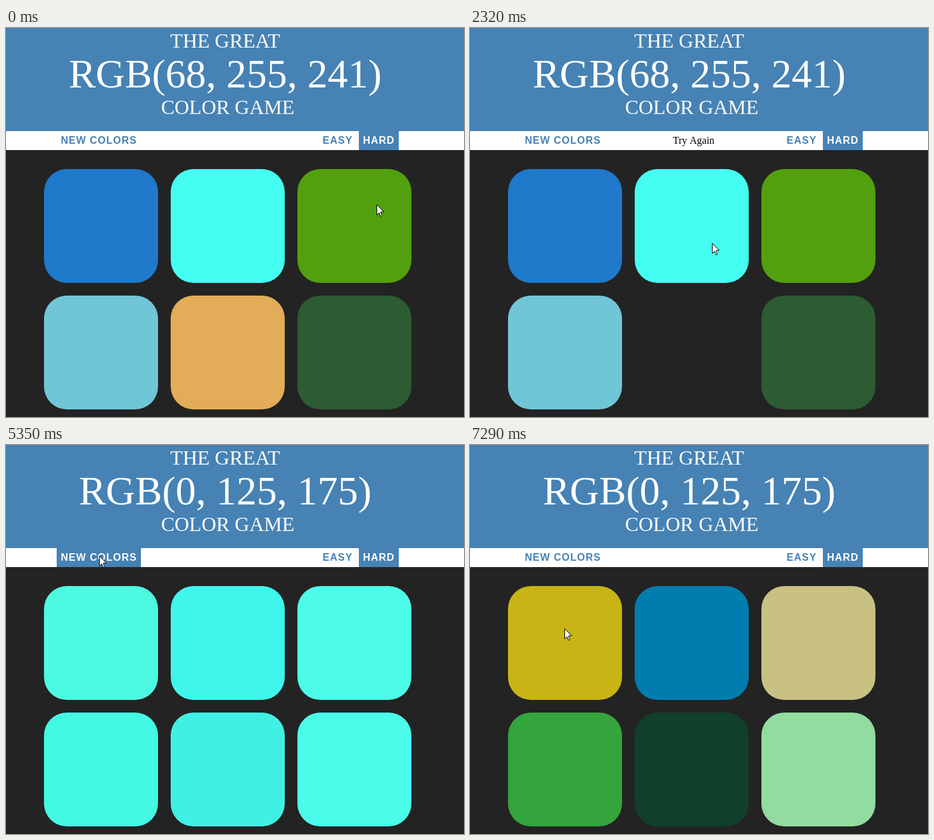
An HTML page with a canvas that plays this animation: 723x615 px, repeating every 8 s.

```html
<!DOCTYPE html>
<html lang="en">
<head>
<meta charset="utf-8">
<title>Color game</title>
<style>
  html, body { margin: 0; width: 100%; height: 100%; overflow: hidden; background: #232323; }
  canvas { display: block; }
</style>
</head>
<body>
<canvas id="stage" width="723" height="615"></canvas>
<script>
const ctx = document.getElementById('stage').getContext('2d');
const SERIF = '"Liberation Serif", "Times New Roman", serif';
const SANS = '"Liberation Sans", Arial, sans-serif';

const toRgb = hex => [1, 3, 5].map(i => parseInt(hex.slice(i, i + 2), 16));
const palette = list => list.split(' ').map(toRgb);
const [BLUE, WHITE, BLACK, DARK, WIN] = palette('#4682b4 #ffffff #000000 #232323 #44fff1');
const firstSet = palette('#1f7acc #44fff1 #52a00e #70c6d6 #e2ac58 #2c5b34');
const nextSet = palette('#c8b414 #007daf #c8c183 #34a43d #10402a #92dca0');

// Scenes start at these times (ms); inside a scene the screen refreshes every STEP
const LOOP = 8000, STEP = 100, FADE = 300;
const AIM = 910, MISS = 1630, HIT = 2800, HOVER = 4250, RESET = 5350, LEAVE = 6930;
const scenes = [0, AIM, MISS, HIT, HOVER, RESET, LEAVE];

// Pointer moves, each going on from where the last one ended
const moves = [
  { start: 0, time: 1, to: [585, 279] },
  { start: AIM - 50, time: 350, to: [439, 463] },
  { start: MISS + 330, time: 360, to: [380, 335] },
  { start: HOVER - 1, time: 1, to: [156, 219] },
  { start: HOVER, time: 500, to: [147, 175] },
  { start: LEAVE - 50, time: 350, to: [149, 290] },
];

// CSS "ease": bisect for the curve parameter at x
function ease(x) {
  if (x <= 0) return 0;
  if (x >= 1) return 1;
  let s = 0.5;
  for (let d = 0.25; d > 1e-6; d /= 2) s += 0.75 * s * (1 - s) + s ** 3 < x ? d : -d;
  return 0.3 * s * (1 - s) ** 2 + 3 * s * s * (1 - s) + s ** 3;
}
const fade = (t, start) => ease((t - start) / FADE);
const mix = (a, b, k) => a.map((v, i) => Math.round(v + (b[i] - v) * k));
const css = color => `rgb(${color})`;

function rect(color, x, y, w, h) {
  ctx.fillStyle = css(color);
  ctx.fillRect(x, y, w, h);
}

function text(str, x, y, font, color, align = 'center', spacing = 0) {
  ctx.font = font;
  ctx.textAlign = align;
  ctx.letterSpacing = spacing + 'px';
  ctx.fillStyle = css(color);
  ctx.fillText(str, x, y);
}

// "lit" runs from 0 (plain) to 1 (selected or hovered)
function button(label, left, right, lit) {
  const x = Math.round(left);
  rect(mix(WHITE, BLUE, lit), x, 163, Math.round(right) - x, 30);
  text(label, left + 6, 183, 'bold 16px ' + SANS, mix(BLUE, WHITE, lit), 'left', 1);
}

function squareColor(i, t) {
  if (t >= RESET) return mix(WIN, nextSet[i], fade(t, RESET - 25));
  const base = i === 4 ? mix(firstSet[i], DARK, fade(t, MISS + 85)) : firstSet[i];
  return mix(base, WIN, fade(t, HIT));
}

function pointer(t) {
  const [x, y] = moves.reduce((at, m) => mix(at, m.to, ease((t - m.start) / m.time)), moves[0].to);
  ctx.save();
  ctx.translate(x + 0.5, y + 0.5);
  ctx.fillStyle = css(WHITE);
  ctx.strokeStyle = css(BLACK);
  const arrow = new Path2D('M0 0V16L3.5 12.5L6 18H7.5L8 17L6 11.5L11 11Z');
  ctx.fill(arrow);
  ctx.stroke(arrow);
  ctx.restore();
}

function draw(t) {
  const won = t >= HIT && t < RESET;
  const missed = t > MISS && t < HIT;
  const inset = won ? 1.5 : 0;

  rect(DARK, 0, 0, 723, 615);
  rect(won ? WIN : BLUE, 0, 0, 723, 163);
  text('THE GREAT', 346, 31, '32px ' + SERIF, WHITE);
  text(t < RESET ? 'RGB(68, 255, 241)' : 'RGB(0, 125, 175)', 346, 94, '64px ' + SERIF, WHITE);
  text('COLOR GAME', 350, 136, '32px ' + SERIF, WHITE);

  rect(WHITE, 0, 163, 723, 30);
  const hover = fade(t, HOVER + 150) - fade(t, LEAVE - 10);
  button(won ? 'PLAY AGAIN?' : 'NEW COLORS', 80.4 + inset, 212.6 - inset, hover);
  button('EASY', 493.8 - inset, 553.4 - inset, 0);
  button('HARD', 557.4 - inset, 619.6 - inset, 1);
  if (won || missed) text(won ? 'Correct!' : 'Try Again', 353 - inset, 183, '16px ' + SERIF, BLACK);

  for (let i = 0; i < 6; i++) {
    ctx.fillStyle = css(squareColor(i, t));
    ctx.beginPath();
    ctx.roundRect(60 + i % 3 * 200, 223 + Math.floor(i / 3) * 200, 180, 180, 36);
    ctx.fill();
  }
  pointer(t);
}

let began;
function frame(now) {
  began ??= now;
  const t = (now - began) % LOOP;
  const start = scenes.findLast(s => s <= t);
  draw(start + Math.floor((t - start) / STEP) * STEP);
  requestAnimationFrame(frame);
}
requestAnimationFrame(frame);
</script>
</body>
</html>
```
